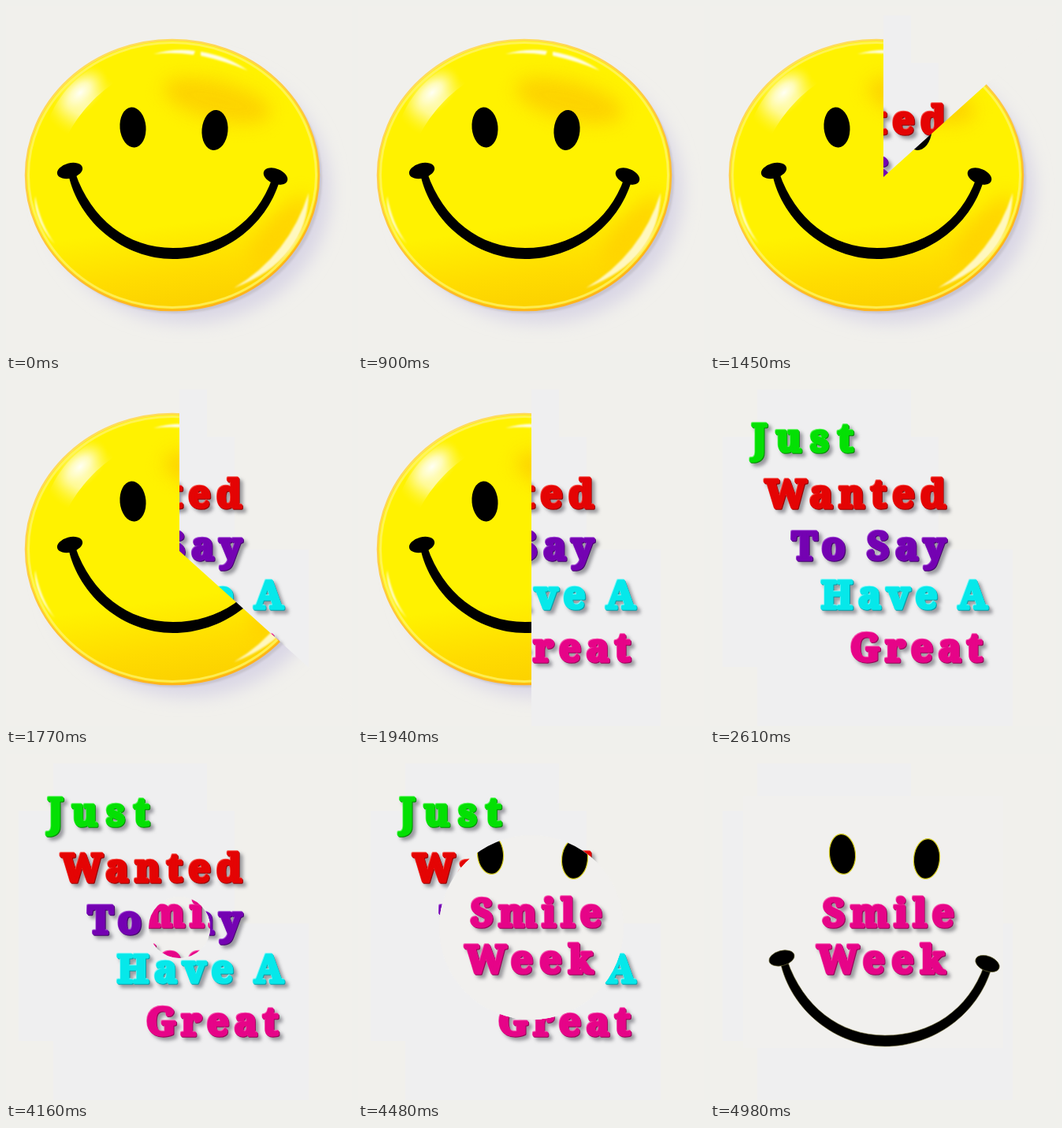
These frames come from a looping animation (439x439 px, 5870 ms). An HTML page:

```html
<!DOCTYPE html>
<html lang="en">
<head>
<meta charset="utf-8">
<title>Smile Week</title>
<style>
  html, body { margin: 0; width: 100%; height: 100%; overflow: hidden; background: #f1f0ec; }
  svg { display: block; width: 100vw; height: 100vh; }
  .line { font: 900 49px "Noto Serif", serif; stroke-width: 3.6; stroke-linejoin: round; white-space: pre; }
  .words { filter: drop-shadow(4px 4px 2px rgba(70, 70, 80, .5)); }
</style>
</head>
<body>
<svg viewBox="0 0 439 439">
  <defs>
    <filter id="soft" x="-50%" y="-50%" width="200%" height="200%"><feGaussianBlur stdDeviation="11"/></filter>
    <filter id="fine" x="-20%" y="-20%" width="140%" height="140%"><feGaussianBlur stdDeviation="1"/></filter>
    <linearGradient id="body" x1=".4" y1="0" x2=".56" y2="1">
      <stop offset=".68" stop-color="#fff200"/>
      <stop offset=".86" stop-color="#ffdc00"/>
      <stop offset="1" stop-color="#fbd000"/>
    </linearGradient>
    <linearGradient id="rim" x1="0" y1="0" x2=".5" y2="1">
      <stop offset="0" stop-color="#ffe468"/>
      <stop offset="1" stop-color="#ffb31c"/>
    </linearGradient>
    <radialGradient id="glare">
      <stop offset="0" stop-color="#fffff4"/>
      <stop offset=".35" stop-color="#fffcc0" stop-opacity=".9"/>
      <stop offset="1" stop-color="#fff430" stop-opacity="0"/>
    </radialGradient>
    <clipPath id="disc"><ellipse cx="211" cy="214.5" rx="186" ry="171.5"/></clipPath>
    <clipPath id="sector"><polygon id="fan"/></clipPath>
    <clipPath id="iris"><circle id="hole" cx="220" cy="220"/></clipPath>
    <ellipse id="eye" rx="16.5" ry="25.5"/>
    <g id="mouth">
      <path d="M79 213C92 275 150 321 212 321S330 280 347 222L338 218C318 275 270 307 212 307S108 270 88 212Z"/>
      <ellipse rx="16.5" ry="9.5" transform="translate(81 209) rotate(-15)"/>
      <ellipse rx="16" ry="9.5" transform="translate(342 216) rotate(22)"/>
    </g>
    <path id="tint" fill="#efeff0" d="M60 12H255V72H290V215H384V439H60V364H16V72H60Z"/>
  </defs>

  <rect width="439" height="439" fill="#f1f0ec"/>

  <g id="face">
    <ellipse cx="231" cy="236" rx="180" ry="166" fill="#d9d6e5" filter="url(#soft)"/>
    <ellipse cx="215" cy="219" rx="186" ry="171" fill="#bcb8c0" opacity=".6" filter="url(#fine)"/>
    <ellipse cx="211" cy="214.5" rx="186" ry="171.5" fill="url(#body)"/>
    <g clip-path="url(#disc)">
      <ellipse cx="268" cy="120" rx="70" ry="25" fill="#fdd000" opacity=".9" filter="url(#soft)" transform="rotate(14 268 120)"/>
      <ellipse cx="348" cy="285" rx="56" ry="20" fill="#ffd000" opacity=".8" filter="url(#soft)" transform="rotate(-50 348 285)"/>
      <path d="M48 163C58 122 84 92 116 75L143 94C117 110 94 133 77 166Z" fill="url(#glare)"/>
      <ellipse cx="94" cy="110" rx="43" ry="25" fill="url(#glare)" transform="rotate(-45 94 110)"/>
    </g>
    <ellipse cx="211" cy="214.5" rx="182.5" ry="168" fill="none" stroke="#fff56c" stroke-width="3" opacity=".75"/>
    <ellipse cx="211" cy="214.5" rx="186" ry="171.5" fill="none" stroke="url(#rim)" stroke-width="2.5"/>
    <g fill="#fffde0" filter="url(#fine)">
      <path d="M187 61Q214 53 240 57L238 62Q212 58 187 61Z"/>
      <path d="M247 58Q280 63 307 82Q279 70 247 63Z"/>
      <path d="M37 241Q43 276 62 302Q46 285 40 265Q36 252 37 241Z"/>
      <path d="M384 237Q383 322 289 358Q359 316 384 237Z" opacity=".85"/>
    </g>
    <use href="#eye" transform="translate(161 154) rotate(-5)"/>
    <use href="#eye" transform="translate(265 157.5) rotate(5)"/>
    <use href="#mouth"/>
  </g>

  <g id="note" clip-path="url(#sector)">
    <rect width="439" height="439" fill="#f1f0ec"/>
    <use href="#tint"/>
    <g class="words" id="noteWords"></g>
  </g>

  <g id="end" clip-path="url(#iris)">
    <rect width="439" height="439" fill="#f1f0ec"/>
    <use href="#tint"/>
    <rect x="42" y="53" width="330" height="320" fill="#f1f0ee"/>
    <g stroke="#d8cf22" stroke-width="1.2">
      <use href="#eye" transform="translate(168 127) rotate(-5)"/>
      <use href="#eye" transform="translate(275 133) rotate(5)"/>
    </g>
    <use href="#mouth" transform="translate(10 50)" stroke="#77733a" stroke-width=".6"/>
    <g class="words" id="endWords"></g>
  </g>
</svg>
<script>
const LOOP = 5870;
const WIPE = [1450, 1610, 1770, 1940, 2110, 2270, 2440, 2610];
const ANGLES = [0, 48, 90, 132, 180, 228, 270, 312, 360];
const IRIS = [4160, 4320, 4480, 4650, 4820, 4980];
const $ = id => document.getElementById(id);

const green = ["#04e004", "#068a06", "#58f858"];
const red = ["#e40404", "#960404", "#f85048"];
const purple = ["#7402b2", "#45046c", "#a044d4"];
const cyan = ["#06e8ea", "#0a9ea8", "#80f8f8"];
const pink = ["#e60488", "#960458", "#f858b0"];

// Three offset copies give each line its raised edge.
function line(text, x, y, [main, dark, light], track) {
  const copy = (color, d) =>
    `<text class="line" x="${x + d}" y="${y + d}" fill="${color}" stroke="${color}" letter-spacing="${track}">${text}</text>`;
  return copy(dark, 0.9) + copy(light, -0.7) + copy(main, 0);
}

$("noteWords").innerHTML =
  line("Just", 53, 91, green, 11) +
  line("Wanted", 70, 162, red, 7.7) +
  line("To Say", 104, 228, purple, 7.3) +
  line("Have A", 141, 290, cyan, 6.8) +
  line("Great", 178, 357, pink, 6.8);
$("endWords").innerHTML =
  line("Smile", 143, 219, pink, 6.8) +
  line("Week", 136, 278, pink, 8.6);

const passed = (times, t) => times.filter(s => t >= s).length;
const show = (id, on) => $(id).setAttribute("visibility", on ? "visible" : "hidden");

function fan(step) {
  const rim = ANGLES.slice(0, step + 1).map(deg => {
    const a = deg * Math.PI / 180;
    return `${220 + 1000 * Math.sin(a)},${217 - 1000 * Math.cos(a)}`;
  });
  return ["220,217", ...rim].join(" ");
}

function draw(now) {
  const t = now % LOOP;
  const wipe = passed(WIPE, t), iris = passed(IRIS, t);
  show("face", (t < 550 || t >= 900) && wipe < WIPE.length);
  show("note", wipe > 0);
  show("end", iris > 0);
  $("fan").setAttribute("points", fan(wipe));
  $("hole").setAttribute("r", iris < IRIS.length ? 39 * iris : 400);
}

const start = performance.now();
function tick() {
  draw(performance.now() - start);
  requestAnimationFrame(tick);
}
tick();
</script>
</body>
</html>
```
